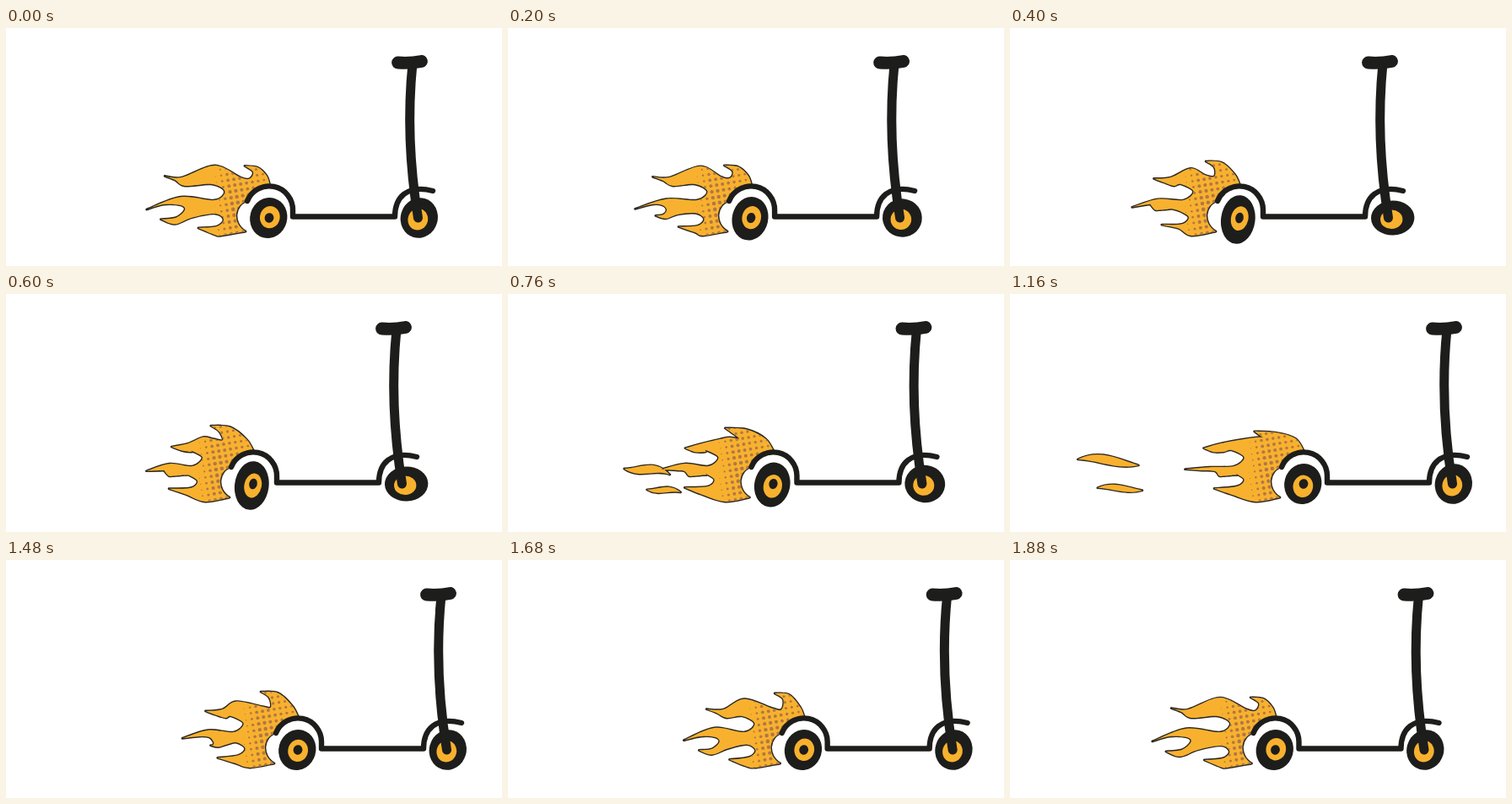
These frames come from a looping animation (588 by 282 pixels, 1.92 s). An HTML page:

```html
<!DOCTYPE html>
<html lang="en">
<head>
<meta charset="utf-8">
<title>Flaming scooter</title>
<style>
  html, body { margin: 0; width: 100%; height: 100%; overflow: hidden; background: #fff; }
  svg { display: block; width: 588px; height: 282px; }
  .ink { fill: none; stroke: #1d1d1b; stroke-linecap: round; stroke-linejoin: round; }
  .black { fill: #1d1d1b; }
  .fire { fill: #f8b12e; }
  .edge { fill: none; stroke: #2b2721; stroke-width: 2.8; stroke-linejoin: round; }
</style>
</head>
<body>
<svg viewBox="0 0 588 282">
  <defs><clipPath id="flameClip"><path id="clipShape"/></clipPath></defs>
  <g id="scooter">
    <path id="edge" class="edge"/>
    <path id="fire" class="fire"/>
    <g id="dots" clip-path="url(#flameClip)" fill="#b17843"/>
    <ellipse id="backTyre" class="black"/>
    <ellipse id="backHub" class="fire"/>
    <ellipse id="backAxle" class="black"/>
    <ellipse id="frontTyre" class="black"/>
    <ellipse id="frontHub" class="fire"/>
    <path class="ink" stroke-width="6.4" d="M286 205A28 28 0 0 1 340 216V223.500H461C461 201 475 185 506 193"/>
    <path class="ink" stroke-width="11" d="M482 42Q473 130 488.500 225"/>
    <path class="ink" stroke-width="14.800" d="M464.500 41Q480 42 492.500 39.500"/>
  </g>
</svg>
<script>
const LOOP = 1920, STEP = 40;
const $ = id => document.getElementById(id);
const mix = (a, b, k) => a + (b - a) * k;

// Cosine that peaks at the given time, once or more often per loop.
const wave = (t, peak, turns = 1) => Math.cos(2 * Math.PI * turns * (t - peak) / LOOP);

// Scooter travel: [time, x].
const stops = [[0, 0], [360, -41], [600, -19], [920, 25], [1080, 43], [1160, 36],
  [1290, 25], [1480, 34], [1640, 41], [1880, 2.5], [LOOP, 0]];

// Monotone cubic interpolation, so that extremes rest on the stops.
function travel(t) {
  const i = stops.findIndex(([end], n) => n > 0 && t <= end) - 1;
  const rate = k => stops[k] && stops[k + 1]
    ? (stops[k + 1][1] - stops[k][1]) / (stops[k + 1][0] - stops[k][0]) : 0;
  const slope = k => {
    const r = rate(k - 1), s = rate(k);
    return r * s > 0 ? 2 * r * s / (r + s) : 0;
  };
  const [t0, a] = stops[i], [t1, b] = stops[i + 1];
  const h = t1 - t0, u = (t - t0) / h;
  return mix(a, b, u * u * (3 - 2 * u)) + h * u * (1 - u) * (slope(i) * (1 - u) - slope(i + 1) * u);
}

// Smooth curve through [x, y] points, broken at tips marked with a third item.
function curve(points) {
  let d = 'M' + points[0].slice(0, 2);
  for (let i = 0; i < points.length - 1; i++) {
    const p = points[i], q = points[i + 1];
    const before = p[2] ? p : points[i - 1], after = q[2] ? q : points[i + 2];
    const c1 = [0, 1].map(k => p[k] + (q[k] - before[k]) / 6);
    const c2 = [0, 1].map(k => q[k] - (after[k] - p[k]) / 6);
    d += `C${c1} ${c2} ${q.slice(0, 2)}`;
  }
  return d;
}

// Four tongues (crown, upper, middle, lower); the middle one forks at times.
function flamePath(t) {
  const w = wave(t, 20), fork = Math.max(0, wave(t, -80));
  const tip = (x, y) => [x, y, true];
  const crown = tip(267 + 16 * w, 160 + 4 * wave(t, 80, 2));
  const upper = tip(200 + 7 * wave(t, 640) + 9 * wave(t, 540, 2), 179.5 - 4 * wave(t, 0));
  const middle = tip(175 + 6 * wave(t, 600) + 6 * wave(t, 490, 2), 211 + 4 * w);
  const lower = tip(216 + 12 * w, 233 + 4 * wave(t, 1850));
  const split = tip(mix(225, 182, fork), mix(215, 227, fork));

  const notch = [279 + 10 * w, 174.5 + 4 * w];
  const bay = [251 + 9.5 * wave(t, 150), 193.5];
  const cove = [249 + 9 * w, 223 + 4 * w];
  return curve([
    tip(313, 187),
    [305.5 + 3.5 * w, 173 + 2 * w],
    [288 + 10 * w, crown[1] + 1.5],
    crown,
    [crown[0] + 10, crown[1] + 7],
    notch,
    [notch[0] - 11, notch[1] - 1.5],
    [246 + 8 * wave(t, 420), 168 - 5 * w],
    [upper[0] + 20, 177],
    upper,
    [upper[0] + 12, upper[1] + 4.5],
    [upper[0] + 24, 187],
    [bay[0] - 15, 185],
    bay,
    [bay[0] - 12, 204],
    [(middle[0] + bay[0] - 12) / 2, 202 - 3.5 * wave(t, 1700, 2) * 0.6 - 1.5 * w],
    middle,
    [middle[0] + 20, 209],
    [207, 210],
    [212, 215.5],
    [mix(218, 201, fork), mix(215.5, 225, fork)],
    split,
    [mix(229, 199, fork), mix(214.5, 233, fork)],
    [mix(233, 220, fork), mix(214.5, 225, fork)],
    [cove[0] - 10, cove[1] - 7],
    cove,
    [cove[0] - 8, cove[1] + 8],
    lower,
    [lower[0] + 20, 237.5 + 8 * fork],
    [255, 246],
    tip(284, 241)
  ]) + 'C268 232 270 209 286 205A28 28 0 0 1 313 187Z';
}

// Tongues that tear off, drift away with a ripple and shrink.
const sparks = [
  { x: 186, y: 208, drift: 178, rise: 21, length: 72, tilt: 7, bulge: 9 },
  { x: 215, y: 232, drift: 185, rise: 4, length: 53, tilt: 3, bulge: 6 }
];

function sparkPath({ x, y, drift, rise, length, tilt, bulge }, p) {
  const left = x - drift * p ** .82, top = y - rise * p * p;
  const long = length * Math.min(1, .6 + .7 * p) * Math.min(1, .3 + 4 * (1 - p));
  const thick = bulge * Math.sin(Math.PI * p) ** .7, ripple = thick * Math.tanh(8 * (p - .6));
  const near = left + .35 * long, far = left + .65 * long;
  return `M${left} ${top}`
    + `C${near} ${top - ripple - thick} ${far} ${top + ripple - thick} ${left + long} ${top + tilt}`
    + `C${far} ${top + ripple + thick} ${near} ${top - ripple + thick} ${left} ${top}Z`;
}

function setEllipse(id, cx, cy, rx, ry, tilt) {
  const attrs = { cx, cy, rx, ry, transform: `rotate(${tilt} ${cx} ${cy})` };
  for (const key in attrs) $(id).setAttribute(key, attrs[key]);
}

function buildDots() {
  let d = '';
  for (let row = -8; row <= 8; row++) for (let col = -6; col <= 8; col++) {
    const x = 268 + col * 6.9 + row * 1.2, y = 208 - col * 1.2 + row * 6.9;
    const r = Math.min((x - 243) / 10, 2.4 - Math.hypot(x - 272, (y - 210) * .6) / 40);
    if (r > .4) d += `<circle cx="${x}" cy="${y}" r="${r}"/>`;
  }
  $('dots').innerHTML = d;
}

function drawWheels(t) {
  const squash = t < 1000 ? Math.sin(Math.PI * t / 1000) ** 2 : 0;
  const sag = 1.2 - 2 * wave(t, 0);
  const s = squash * 1.08, lean = 16 - 18 * s;
  setEllipse('backTyre', 311.3 - s, 225 + 2 * s, 22 - 1.8 * s, 24.2 + 4.8 * s, 16 - 9 * s);
  setEllipse('backHub', 312.5 - sag * .4, 225 + sag, 11.8 - 1.6 * s, 13.2 + 1.4 * s, 12);
  setEllipse('backAxle', 312, 225, 5.4 - .6 * s, 5.8 + .6 * s, 12);
  setEllipse('frontTyre', 489.8 + 4 * s, 225, 22 + 3.8 * s, 24 - 3.6 * s, lean);
  setEllipse('frontHub', 488.3 + 4 * s, 226.8, 11.8 + 1.4 * s, 12.8 - 1.6 * s, lean);
}

function draw(t) {
  $('scooter').setAttribute('transform', `translate(${travel(t)} 0)`);
  const body = flamePath(t), life = (t - 600) / 740;
  const loose = life > 0 && life < 1 ? sparks.map(s => sparkPath(s, life)).join('') : '';
  $('edge').setAttribute('d', body + loose);
  $('fire').setAttribute('d', body + loose);
  $('clipShape').setAttribute('d', body);
  drawWheels(t);
}

buildDots();
const start = performance.now();
function tick() {
  const t = (performance.now() - start) % LOOP;
  draw(Math.floor(t / STEP) * STEP);
  requestAnimationFrame(tick);
}
tick();
</script>
</body>
</html>
```
